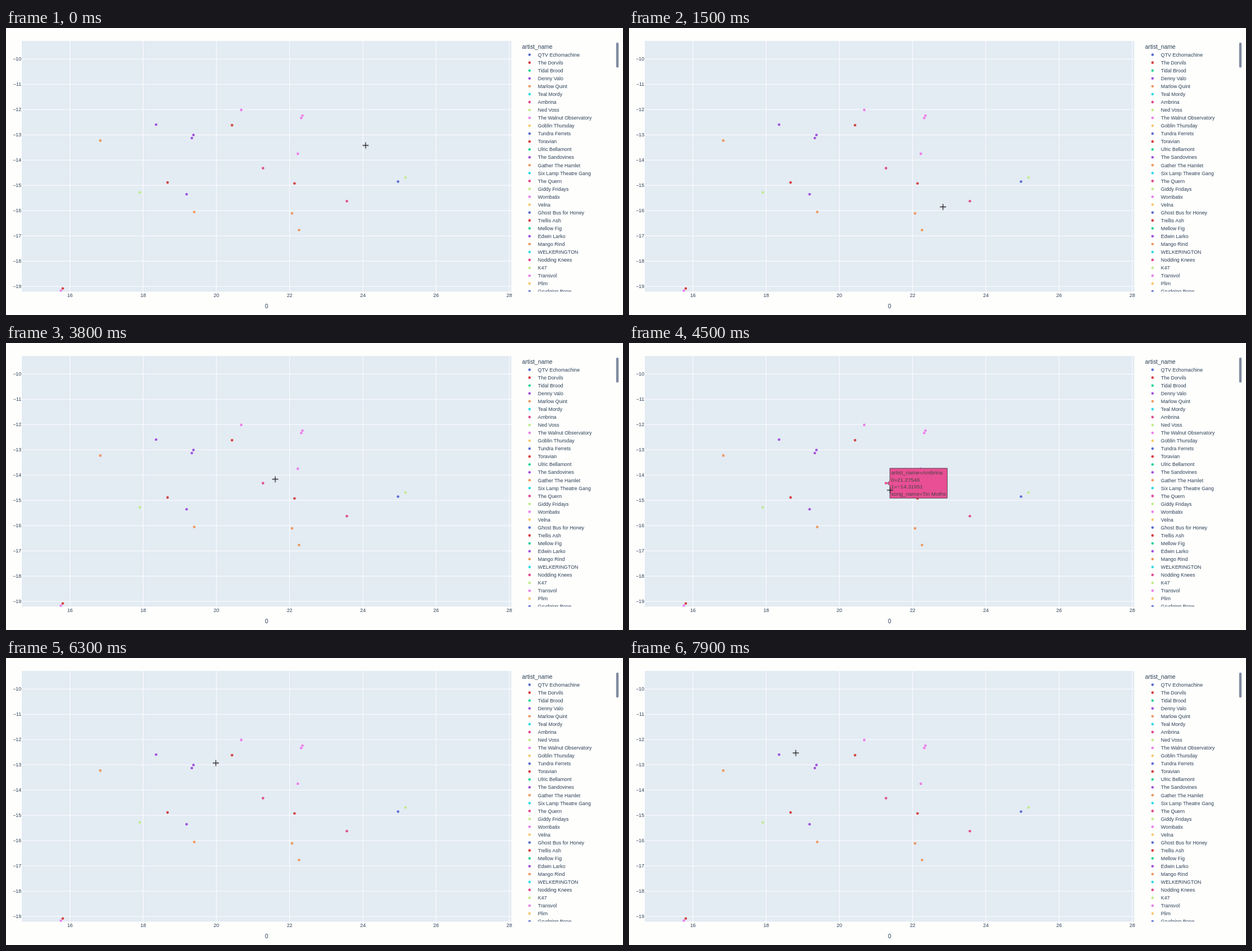
These frames come from a looping animation (1096 by 511 pixels, 8000 ms). An HTML page with a canvas:

```html
<!DOCTYPE html>
<html lang="en">
<head>
<meta charset="utf-8">
<title>Scatter plot hover</title>
<style>
html, body { margin: 0; width: 100%; height: 100%; overflow: hidden; background: #fefefd; }
canvas { display: block; }
</style>
</head>
<body>
<canvas id="stage" width="1096" height="511"></canvas>
<script>
const ctx = document.getElementById('stage').getContext('2d');
const LOOP = 8000;
const FONT = '"Liberation Sans", Arial, sans-serif';
const INK = '#2a3f55';
const SMALL = 8.87, TIP_SIZE = 9.62, LARGE = 10.35;
const PLOT = { x: 28, y: 23, w: 869.7, h: 446.4 };

const [BLUE, RED, GREEN, PURPLE, ORANGE, CYAN, PINK, LIME, MAGENTA, YELLOW] = [0, 1, 2, 3, 4, 5, 6, 7, 8, 9];
const COLORS = ['#5c6fd3', '#d54343', '#2bd29c', '#a052dc', '#ee9860', '#35dae6', '#e14f92', '#bfec88', '#ec80ec', '#f6c96c'];
const TIP_FILL = { [RED]: '#dc4440', [PURPLE]: '#a253ee', [ORANGE]: '#f7995e', [PINK]: '#e84f94' };

const LEGEND = [
  'QTV Echomachine', 'The Dorvils', 'Tidal Brood', 'Denny Valo', 'Marlow Quint', 'Teal Mordy',
  'Ambrina', 'Ned Voss', 'The Walnut Observatory', 'Goblin Thursday', 'Tundra Ferrets', 'Toravian',
  'Ulric Bellamont', 'The Sandovines', 'Gather The Hamlet', 'Six Lamp Theatre Gang', 'The Quern',
  'Giddy Fridays', 'Wombatix', 'Velna', 'Ghost Bus for Honey', 'Trellis Ash', 'Mellow Fig',
  'Edwin Larko', 'Mango Rind', 'WELKERINGTON', 'Nodding Knees', 'K47', 'Transvol', 'Plim', 'Grudging Bone'
];

const DOTS = [
  [167.5, 200.4, ORANGE], [266.6, 172, PURPLE], [333, 190.5, PURPLE], [330.1, 196, PURPLE],
  [417.9, 145.9, MAGENTA], [401.5, 173.1, RED], [526.6, 156, MAGENTA], [524.5, 160.3, MAGENTA],
  [518.4, 223.9, MAGENTA], [456.5, 249.6, PINK], [287, 275.1, RED], [512.5, 276.8, RED],
  [237.6, 292.8, LIME], [320.8, 296, PURPLE], [334.4, 327.6, ORANGE], [508.1, 330.1, ORANGE],
  [520.6, 359.7, ORANGE], [605.5, 308.3, PINK], [696.4, 273.5, BLUE], [709.6, 266.3, LIME],
  [100.8, 463.7, RED], [97.5, 467.9, MAGENTA]
];

const makeTip = (dot, artist, x, y, song) => ({
  dot: DOTS[dot],
  lines: ['artist_name=' + artist, '0=' + x, '1=−' + y, 'song_name=' + song]
});
const TIPS = {
  lantern: makeTip(17, 'The Quern', '23.56642', '15.62718', 'Paper Lantern Parade (Remixed)'),
  copper: makeTip(15, 'Olive Tandem', '22.06731', '16.10924', 'Copper Market'),
  blunder: makeTip(16, 'The Gallance', '22.26054', '16.77174', 'One Minor Blunder - CD Album Version'),
  moths: makeTip(9, 'Ambrina', '21.27546', '14.31951', 'Tin Moths'),
  borrowed: makeTip(11, 'Trellis Ash', '22.13612', '14.92693', 'Borrowed Lanterns for Noon'),
  fig: makeTip(5, 'Toravian', '20.42963', '12.61908', 'Pale Fig'),
  blush: makeTip(3, 'Daze Plum', '19.32864', '13.1309', 'Silent Blush (feat. Conrad Mondevarros)')
};

// Pointer samples: time, x, y, hovered tip. Each holds until the next.
const POINTER = [
  [0, 639, 209], [600, 625, 261], [700, 611, 312, 'lantern'],
  [1500, 558, 318.5], [1600, 532, 329], [1700, 513, 333, 'copper'], [1900, 510, 332, 'copper'],
  [2600, 513, 343, 'copper'], [2700, 516.5, 355, 'blunder'],
  [3300, 515, 349, 'blunder'], [3400, 511, 336, 'copper'], [3500, 505, 314, 'copper'],
  [3600, 497, 289], [3700, 488, 264], [3800, 478.5, 242.5], [3900, 470, 242, 'moths'], [4000, 465, 244, 'moths'],
  [4400, 459, 250, 'moths'], [4500, 464, 262, 'moths'],
  [4700, 485, 270, 'borrowed'], [4800, 500, 272, 'borrowed'],
  [5000, 448.5, 237], [5200, 412, 178, 'fig'], [5400, 406, 178, 'fig'], [6000, 405, 179, 'fig'],
  [6200, 394, 182, 'fig'], [6300, 373, 187], [6400, 347, 192], [6500, 330, 195, 'blush'], [6700, 328, 194.5, 'blush'],
  [7600, 323, 191, 'blush'], [7700, 314, 183], [7800, 304, 175], [7900, 296.5, 169]
];

function text(str, x, y, size, align = 'left', color = INK) {
  ctx.font = `${size}px ${FONT}`;
  ctx.textAlign = align;
  ctx.fillStyle = color;
  ctx.fillText(str, x, y);
}

function dot(x, y, color) {
  ctx.fillStyle = COLORS[color];
  ctx.beginPath();
  ctx.arc(x, y, 2.3, 0, Math.PI * 2);
  ctx.fill();
}

function clipped(x, y, w, h, draw) {
  ctx.save();
  ctx.beginPath();
  ctx.rect(x, y, w, h);
  ctx.clip();
  draw();
  ctx.restore();
}

function drawPlot() {
  ctx.fillStyle = '#e3ebf3';
  ctx.fillRect(PLOT.x, PLOT.y, PLOT.w, PLOT.h);
  for (let i = 0; i < 7; i++) {
    const x = 113.6 + i * 130.07;
    ctx.fillStyle = '#fff';
    ctx.fillRect(x - 0.5, PLOT.y, 1, PLOT.h);
    text(16 + 2 * i, x, 479.2, SMALL, 'center');
  }
  for (let i = 0; i < 10; i++) {
    const y = 55.3 + i * 44.98;
    ctx.fillStyle = '#fff';
    ctx.fillRect(PLOT.x, y - 0.5, PLOT.w, 1);
    text('−' + (10 + i), 27.2, y + 3.1, SMALL, 'right');
  }
  text('0', 462.8, 499.2, LARGE, 'center');
  clipped(PLOT.x, PLOT.y, PLOT.w, PLOT.h, () => DOTS.forEach(d => dot(...d)));
}

function drawLegend() {
  text('artist_name', 916.8, 36.8, LARGE);
  clipped(900, 24, 180, 445.5, () => LEGEND.forEach((name, i) => {
    const y = 47.6 + i * 14.05;
    dot(930, y, i % 10);
    text(name, 944.8, y + 3.2, SMALL);
  }));
  ctx.fillStyle = '#808ba0';
  ctx.beginPath();
  ctx.roundRect(1083.8, 26, 4.4, 44.4, 2);
  ctx.fill();
}

function drawTip({ dot: [px, y, color], lines }) {
  const tipX = px + 2.4, arrow = 4.4, pad = 2.2, half = 26.6;
  ctx.font = `${TIP_SIZE}px ${FONT}`;
  const width = Math.max(...lines.map(line => ctx.measureText(line).width)) + 2 * pad;
  const left = tipX + arrow, right = left + width;
  ctx.beginPath();
  ctx.moveTo(tipX, y);
  ctx.lineTo(left, y + arrow);
  ctx.lineTo(left, y + half);
  ctx.lineTo(right, y + half);
  ctx.lineTo(right, y - half);
  ctx.lineTo(left, y - half);
  ctx.lineTo(left, y - arrow);
  ctx.closePath();
  ctx.fillStyle = TIP_FILL[color];
  ctx.fill();
  ctx.strokeStyle = '#444';
  ctx.lineWidth = 0.9;
  ctx.stroke();
  lines.forEach((line, i) => text(line, left + pad, y - 15.5 + i * 12.5, TIP_SIZE, 'left', '#444'));
}

function cross(x, y, color, width) {
  ctx.strokeStyle = color;
  ctx.lineWidth = width;
  ctx.beginPath();
  ctx.moveTo(x - 5.4, y);
  ctx.lineTo(x + 5.4, y);
  ctx.moveTo(x, y - 5.4);
  ctx.lineTo(x, y + 5.4);
  ctx.stroke();
}

function drawPointer(x, y) {
  cross(x, y + 1.3, 'rgba(70, 65, 65, 0.16)', 2.6);
  cross(x - 0.3, y - 0.1, '#222225', 1.1);
}

function frame(now) {
  const t = now % LOOP;
  const [, x, y, tip] = POINTER.findLast(sample => sample[0] <= t);
  ctx.fillStyle = '#fefefd';
  ctx.fillRect(0, 0, 1096, 511);
  drawPlot();
  drawLegend();
  if (tip) drawTip(TIPS[tip]);
  drawPointer(x, y);
}

const start = performance.now();
function tick() {
  frame(performance.now() - start);
  requestAnimationFrame(tick);
}
tick();
</script>
</body>
</html>
```
